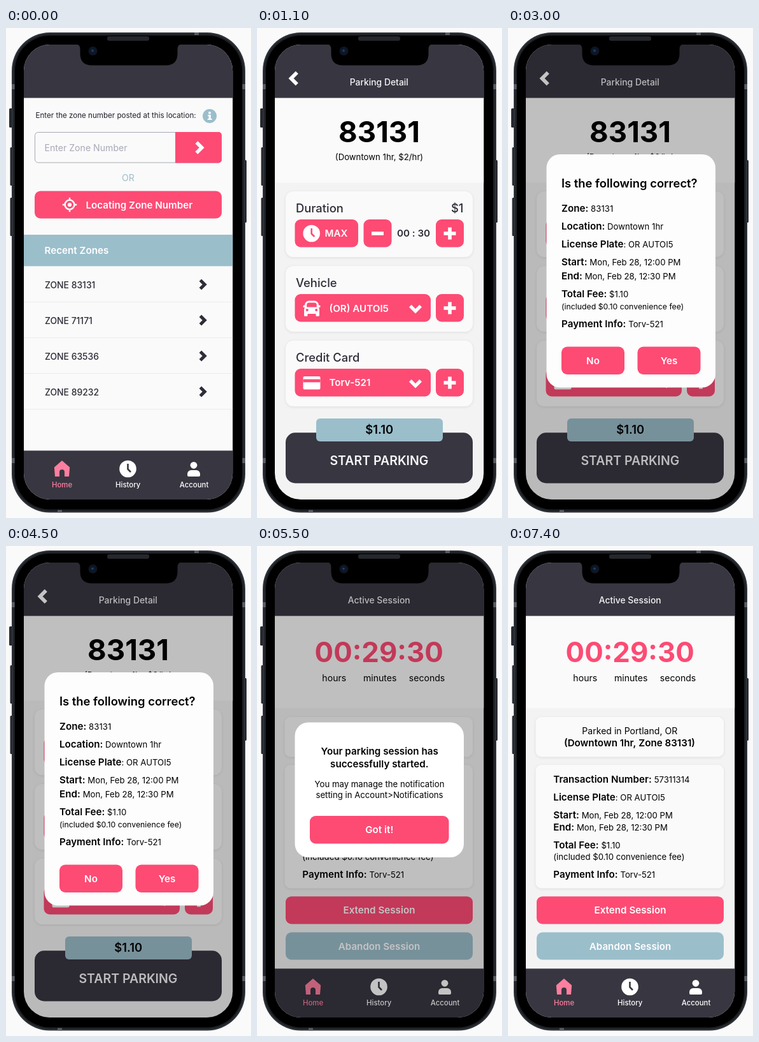
Write an HTML page with a canvas that moves like this. It is 385 px wide and 768 px high and loops after 8500 ms.

```html
<!DOCTYPE html>
<html lang="en">
<head>
<meta charset="utf-8">
<title>Parking app</title>
<style>
  html, body { margin: 0; width: 100%; height: 100%; overflow: hidden; background: #fafafa; }
  canvas { display: block; width: 385px; height: 768px; }
</style>
</head>
<body>
<canvas id="stage"></canvas>
<script>
const W = 385, H = 768, LOOP = 8500, STEP = 100;
const SCREEN = { x: 28, y: 26, w: 328.2, h: 713, r: 41 };
const PINK = '#fd4b74', BLUE = '#9bbecb', DARK = '#383641', INK = '#2e2d38',
      LIGHT = '#fafafa', GREY = '#f3f3f3', WHITE = '#fff', BLACK = '#000', ROSE = '#fd7f9f';
// Type sizes
const BIG = 18.4, BOLD = 15.2, BODY = 14.1, SMALL = 13.2, TAB = 11.4;

const canvas = document.getElementById('stage');
const ctx = canvas.getContext('2d');
const dpr = window.devicePixelRatio || 1;
canvas.width = W * dpr;
canvas.height = H * dpr;

// ---------- drawing helpers ----------
function rect(x, y, w, h, color) {
  ctx.fillStyle = color;
  ctx.fillRect(x, y, w, h);
}

function round(x, y, w, h, r, color) {
  ctx.beginPath();
  ctx.roundRect(x, y, w, h, r);
  ctx.fillStyle = color;
  ctx.fill();
}

function circle(x, y, r, color) {
  ctx.beginPath();
  ctx.arc(x, y, r, 0, Math.PI * 2);
  ctx.fillStyle = color;
  ctx.fill();
}

function line(points, width, color) {
  ctx.beginPath();
  points.forEach(([x, y]) => ctx.lineTo(x, y));
  ctx.lineWidth = width;
  ctx.strokeStyle = color;
  ctx.stroke();
}

function text(str, x, y, size, weight = 400, color = BLACK, align = 'left') {
  ctx.font = `${weight} ${size}px Inter, sans-serif`;
  ctx.textAlign = align;
  ctx.fillStyle = color;
  ctx.fillText(str, x, y);
  return ctx.measureText(str).width;
}

const center = (str, x, y, size, weight, color) => text(str, x, y, size, weight, color, 'center');

// Bold label followed by a regular value
function row(label, value, x, y) {
  const w = text(label, x, y, BOLD, 600);
  text(value, x + w, y, SMALL);
}

function card(x, y, w, h, r = 12) {
  ctx.save();
  ctx.shadowColor = 'rgba(0,0,0,.09)';
  ctx.shadowBlur = 5 * dpr;
  ctx.shadowOffsetY = dpr;
  round(x, y, w, h, r, LIGHT);
  ctx.restore();
}

function button(label, x, y, w, h, color = PINK) {
  round(x, y, w, h, 9, color);
  if (label) center(label, x + w / 2, y + h / 2 + 5.6, BOLD, 600, WHITE);
}

// ---------- icons ----------
function chevron(x, y, size, angle, color, width) {
  ctx.save();
  ctx.translate(x, y);
  ctx.rotate(angle);
  line([[-size / 2, -size], [size / 2, 0], [-size / 2, size]], width, color);
  ctx.restore();
}

function plus(x, y) {
  rect(x - 9.5, y - 2.8, 19, 5.6, WHITE);
  rect(x - 2.8, y - 9.5, 5.6, 19, WHITE);
}

function clock(x, y, color, hands) {
  circle(x, y, 13.3, color);
  line([[x, y - 8], [x, y + 0.5], [x + 4.5, y + 5]], 2.6, hands);
}

function infoIcon(x, y) {
  circle(x, y, 11, BLUE);
  circle(x, y - 5, 2, WHITE);
  rect(x - 2.8, y - 1.8, 4.6, 2, WHITE);
  rect(x - 1.4, y - 1.8, 3.2, 7.5, WHITE);
  rect(x - 3.2, y + 4, 6.8, 2, WHITE);
}

function locateIcon(x, y) {
  ctx.beginPath();
  ctx.arc(x, y, 7.4, 0, Math.PI * 2);
  ctx.lineWidth = 2.5;
  ctx.strokeStyle = WHITE;
  ctx.stroke();
  circle(x, y, 3.1, WHITE);
  for (const [dx, dy] of [[1, 0], [-1, 0], [0, 1], [0, -1]])
    line([[x + dx * 7, y + dy * 7], [x + dx * 11.2, y + dy * 11.2]], 2.4, WHITE);
}

function carIcon(x, y) {
  ctx.beginPath();
  ctx.roundRect(x - 9.3, y - 10.5, 18.6, 14, [5, 5, 0, 0]);
  ctx.lineWidth = 3;
  ctx.strokeStyle = WHITE;
  ctx.stroke();
  round(x - 13.5, y - 5, 5, 3.4, 1.5, WHITE);
  round(x + 8.5, y - 5, 5, 3.4, 1.5, WHITE);
  round(x - 12, y - 2, 24, 10.5, [4, 4, 1, 1], WHITE);
  round(x - 12, y + 6, 5.5, 6.2, 1.5, WHITE);
  round(x + 6.5, y + 6, 5.5, 6.2, 1.5, WHITE);
  circle(x - 7.2, y + 2.5, 2, PINK);
  circle(x + 7.2, y + 2.5, 2, PINK);
}

function cardIcon(x, y) {
  round(x - 13.5, y - 10, 27, 20.5, 2, WHITE);
  rect(x - 13.5, y - 5.5, 27, 4.8, PINK);
}

function houseIcon(x, y) {
  ctx.beginPath();
  ctx.moveTo(x, y - 13);
  ctx.lineTo(x + 12.2, y - 2.5);
  ctx.lineTo(x + 11, y + 12);
  ctx.lineTo(x + 4, y + 12);
  ctx.lineTo(x + 4, y + 5);
  ctx.arc(x, y + 5, 4, 0, Math.PI, true);
  ctx.lineTo(x - 4, y + 12);
  ctx.lineTo(x - 11, y + 12);
  ctx.lineTo(x - 12.2, y - 2.5);
  ctx.closePath();
  ctx.fillStyle = ROSE;
  ctx.fill();
}

// ---------- screens ----------
function header(title) {
  rect(28, 26, 329, 83.6, DARK);
  if (title) center(title, 191.7, 90, 13.9, 500, '#f4f4f6');
}

function tabBar() {
  rect(28, 662.4, 329, 78, DARK);
  houseIcon(88, 691);
  clock(191.5, 691, WHITE, DARK);
  circle(295, 685.3, 5.4, WHITE);
  round(285, 693, 20, 10, [6, 6, 2, 2], WHITE);
  center('Home', 88, 720, TAB, 500, ROSE);
  center('History', 191.7, 720, TAB, 500, WHITE);
  center('Account', 295.5, 720, TAB, 500, WHITE);
}

function home() {
  rect(28, 26, 329, 714, LIGHT);
  header();
  text('Enter the zone number posted at this location:', 46.5, 141.3, 11.6, 400, '#1f1e28');
  infoIcon(320, 138);

  ctx.beginPath();
  ctx.roundRect(45.5, 163.5, 293, 47.5, 5);
  ctx.lineWidth = 1;
  ctx.strokeStyle = '#a8a8b6';
  ctx.stroke();
  text('Enter Zone Number', 60.5, 193, BODY, 400, '#a9a9b8');
  round(266, 163, 73, 48.5, [0, 5, 5, 0], PINK);
  chevron(303.5, 187.5, 8.3, 0, WHITE, 5.6);

  center('OR', 192, 239.5, BODY, 400, BLUE);
  button('', 45, 255.5, 294, 43);
  locateIcon(100, 277);
  text('Locating Zone Number', 125.5, 282.6, BOLD, 600, WHITE);

  rect(28, 324, 329, 49.3, BLUE);
  text('Recent Zones', 60.5, 354, BOLD, 600, WHITE);
  [83131, 71171, 63536, 89232].forEach((zone, i) => {
    const y = 403 + i * 56;
    text(`ZONE ${zone}`, 61, y + 5, 13.9, 500, INK);
    chevron(308.8, y - 1, 6.8, 0, INK, 5);
    rect(28, y + 26, 329, 1, '#ebebed');
  });
  tabBar();
}

function detail() {
  rect(28, 26, 329, 714, GREY);
  rect(28, 109, 329, 133.5, LIGHT);
  header('Parking Detail');
  chevron(58.2, 79, 9.2, Math.PI, WHITE, 5.8);
  center('83131', 192, 179, 45.6, 700);
  center('(Downtown 1hr, $2/hr)', 192, 207.3, SMALL);

  [['Duration', 256], ['Vehicle', 373], ['Credit Card', 490]].forEach(([title, y]) => {
    card(45, y, 294, 103);
    text(title, 61, y + 32.5, BIG, 500, INK);
    button('', 281, y + 44, 44, 43.5);
    plus(303, y + 66);
  });
  text('$1', 324.5, 288.5, BIG, 500, INK, 'right');

  button('', 59.5, 300, 99.5, 43.5);
  clock(85.7, 322, WHITE, PINK);
  text('MAX', 106.5, 327.3, BOLD, 600, WHITE);
  button('', 167.5, 300, 44, 43.5);
  rect(180, 319.2, 19, 5.6, WHITE);
  center('00 : 30', 246, 327.3, BOLD, 600, INK);

  for (const y of [417, 534]) {
    button('', 59.5, y, 213.5, 43.5);
    chevron(249, y + 22.8, 8.2, Math.PI / 2, WHITE, 5.2);
  }
  carIcon(86, 439.5);
  text('(OR) AUTOI5', 113.5, 444.5, BOLD, 600, WHITE);
  cardIcon(86, 556);
  text('Torv-521', 113.5, 561, BOLD, 600, WHITE);

  round(45, 634.3, 294, 79.2, 15, DARK);
  center('START PARKING', 192, 684.8, 19.5, 600, '#f6f6f7');
  round(93, 612, 199, 36, 6, BLUE);
  center('$1.10', 192.3, 636.4, BIG, 600);
}

function active() {
  rect(28, 26, 329, 714, GREY);
  rect(28, 109, 329, 145, LIGHT);
  header('Active Session');
  center('00:29:30', 191.7, 182, 43.8, 700, PINK);
  center('hours', 121.3, 211.5, BODY);
  center('minutes', 193.2, 211.5, BODY);
  center('seconds', 267, 211.5, BODY);

  card(43.5, 268, 295.5, 62.5, 9);
  center('Parked in Portland, OR', 191.3, 294.5, BODY);
  center('(Downtown 1hr, Zone 83131)', 191, 314, BOLD, 600);

  card(43.5, 343, 295.5, 193.5, 9);
  row('Transaction Number: ', '57311314', 71.3, 370.7);
  row('License Plate', ': OR AUTOI5', 71.3, 399);
  row('Start: ', 'Mon, Feb 28, 12:00 PM', 71.3, 427);
  row('End: ', 'Mon, Feb 28, 12:30 PM', 71.3, 446.3);
  row('Total Fee: ', '$1.10', 71.3, 474);
  text('(included $0.10 convenience fee)', 71.3, 492, SMALL);
  row('Payment Info: ', 'Torv-521', 71.3, 520);

  button('Extend Session', 45, 549.2, 294, 43.3);
  button('Abandon Session', 45, 605.5, 294, 43, BLUE);
  tabBar();
}

function confirmSheet() {
  round(60.5, 198, 265.5, 365.5, 21, '#fdfdfd');
  text('Is the following correct?', 84, 250, BIG, 600);
  row('Zone: ', '83131', 84, 288);
  row('Location: ', 'Downtown 1hr', 84, 316);
  row('License Plate', ': OR AUTOI5', 84, 344.3);
  row('Start: ', 'Mon, Feb 28, 12:00 PM', 84, 372.3);
  row('End: ', 'Mon, Feb 28, 12:30 PM', 84, 394.3);
  row('Total Fee: ', '$1.10', 84, 422);
  text('(included $0.10 convenience fee)', 84, 440.6, 12.3);
  row('Payment Info: ', 'Torv-521', 84, 469);
  button('No', 84, 499.5, 99, 43.5);
  button('Yes', 203.5, 499.5, 99, 43.5);
}

function notice() {
  round(59.5, 276.5, 265.5, 211.5, 21, WHITE);
  center('Your parking session has', 192.7, 327.3, BOLD, 600);
  center('successfully started.', 192.3, 346.5, BOLD, 600);
  center('You may manage the notification', 192.5, 377.5, SMALL);
  center('setting in Account>Notifications', 192.5, 395, SMALL);
  button('Got it!', 83, 423, 218.5, 43.5);
}

function phone() {
  const rim = '#2c3037', key = '#25282e', band = '#5a5e66';
  round(5, 126, 6, 30, 1.5, key);
  round(6.5, 187, 5, 60, 1.5, key);
  round(6.5, 266, 5, 60, 1.5, key);
  round(374, 207, 4, 98, 1.5, key);
  round(9, 7, 367, 752.5, 60, rim);
  round(11.5, 9.5, 362, 747.5, 57.5, '#1c1e22');
  for (const y of [88, 674]) {
    rect(9, y, 4.5, 8, band);
    rect(371.5, y, 4.5, 8, band);
  }
  rect(296, 7, 7, 4, band);
  rect(81, 755.5, 7, 4, band);
  round(14, 12, 357, 742.5, 55, BLACK);
  round(159, 13, 66, 7, 3, '#25272c');
}

function notch() {
  ctx.beginPath();
  ctx.moveTo(110, 25);
  ctx.lineTo(276, 25);
  ctx.quadraticCurveTo(269.5, 26, 269.5, 33);
  ctx.lineTo(269.5, 40);
  ctx.quadraticCurveTo(269.5, 58.5, 251, 58.5);
  ctx.lineTo(135, 58.5);
  ctx.quadraticCurveTo(116.5, 58.5, 116.5, 40);
  ctx.lineTo(116.5, 33);
  ctx.quadraticCurveTo(116.5, 26, 110, 25);
  ctx.fillStyle = BLACK;
  ctx.fill();
  circle(136.5, 36, 7, '#10151f');
  circle(136.5, 36, 4.2, '#0c1a2e');
  circle(136, 35.5, 1.7, '#1a4070');
}

// ---------- motion ----------
// cubic-bezier(0, 0, .58, 1)
function easeOut(t) {
  if (t <= 0) return 0;
  if (t >= 1) return 1;
  let lo = 0, hi = 1;
  for (let i = 0; i < 24; i++) {
    const s = (lo + hi) / 2;
    if (1.74 * s * s - 0.74 * s * s * s < t) lo = s; else hi = s;
  }
  return 3 * lo * lo - 2 * lo * lo * lo;
}

const tween = (t, start, length) => easeOut((t - start) / length);

function dim(amount) {
  rect(28, 26, 329, 714, `rgba(0,0,0,${0.235 * amount})`);
}

function shifted(dx, dy, draw) {
  ctx.save();
  ctx.translate(dx, dy);
  draw();
  ctx.restore();
}

function push(from, to, p) {
  if (p < 1) shifted(-SCREEN.w * p, 0, from);
  if (p > 0) shifted(SCREEN.w * (1 - p), 0, to);
}

function detailWithSheet(t) {
  detail();
  const p = tween(t, 2630, 250);
  if (p > 0) {
    dim(p);
    shifted(0, 542.5 * (1 - p), confirmSheet);
  }
}

function activeWithNotice(t) {
  active();
  const p = tween(t, 5060, 400) * (1 - tween(t, 7060, 300));
  if (p > 0) {
    dim(p);
    ctx.globalAlpha = p;
    notice();
    ctx.globalAlpha = 1;
  }
}

function draw(t) {
  ctx.setTransform(dpr, 0, 0, dpr, 0, 0);
  rect(0, 0, W, H, LIGHT);
  phone();
  ctx.save();
  ctx.beginPath();
  ctx.roundRect(SCREEN.x, SCREEN.y, SCREEN.w, SCREEN.h, SCREEN.r);
  ctx.clip();
  if (t < 2600) push(home, detail, tween(t, 760, 300));
  else push(() => detailWithSheet(t), () => activeWithNotice(t), tween(t, 4560, 300));
  ctx.restore();
  notch();
}

function frame() {
  const t = performance.now() % LOOP;
  draw(Math.floor(t / STEP) * STEP);
  requestAnimationFrame(frame);
}
frame();
</script>
</body>
</html>
```
